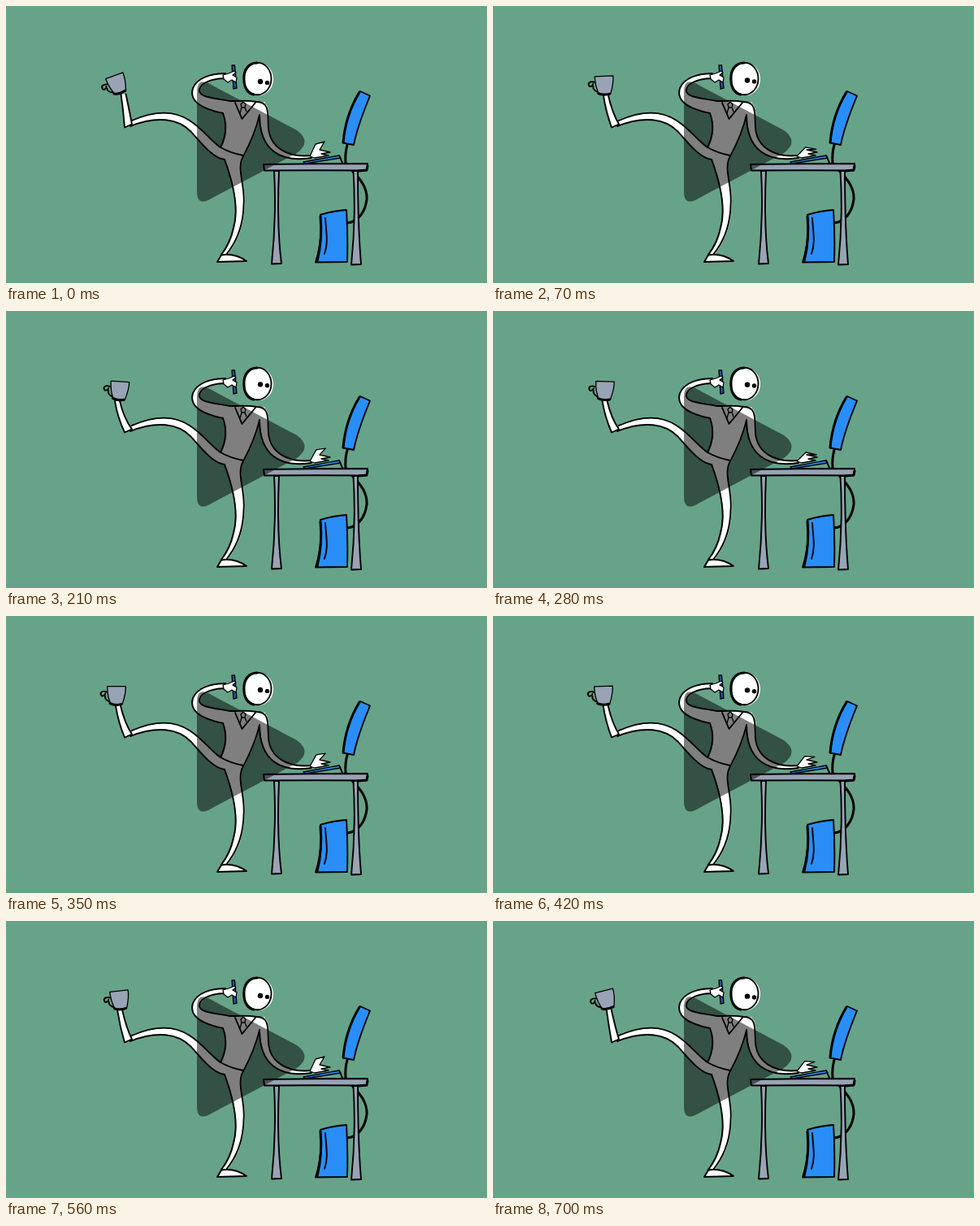
An HTML page that plays this animation: 592x341 px, repeating every 770 ms.

```html
<!DOCTYPE html>
<html lang="en">
<head>
<meta charset="utf-8">
<title>Busy at the desk</title>
<style>
  html, body { margin: 0; width: 100%; height: 100%; overflow: hidden; background: #67a389; }
  svg { display: block; width: 592px; height: 341px; }
  .white { fill: #fff; }
  .blue { fill: #2a8ef8; }
  .steel { fill: #98a3b5; }
  .line { fill: none; }
  .ink { stroke: #000; stroke-width: 1.9; stroke-linecap: round; stroke-linejoin: round; }
  .thin { stroke-width: 1.3; }
  .bold { stroke-width: 3; }
</style>
</head>
<body>
<svg viewBox="0 0 592 341">
  <!-- computer -->
  <g class="ink">
    <path class="line bold" d="M418 193C427 206 445 217 444 238C442 255 432 266 420 267"/>
    <path class="blue" d="M387 257Q403 252 419 251Q421 283 420 315Q401 315 381 315.500C386 300 389 280 387 257Z"/>
    <path class="line bold" d="M387 259C389 280 387 298 383 314"/>
    <path class="line" d="M393 261C394 278 397 292 392 305"/>
    <path class="line bold" d="M420 171Q417 182 418 193"/>
    <path class="blue" d="M436 105L448 110.500C440 130 432 150 428 171L415 168.500C417 145 424 124 436 105Z"/>
    <path class="line bold" d="M435 106C424 124 417 145 415 168"/>
  </g>

  <!-- desk -->
  <g class="ink steel">
    <path d="M330 203H336Q333 270 339 317L327 317.500Q333 260 330 203Z"/>
    <path d="M427.500 203H433Q433 270 437 318L425 318.500Q431 260 427.500 203Z"/>
    <path d="M317 195Q380 194 445 194L444 202.500Q380 202 318 202.500Z"/>
  </g>
  <path class="line ink bold" d="M434 203L444 202L445 197"/>
  <path class="blue ink thin" d="M366 192L410 184L412 187L368 194Z"/>
  <path class="line ink" d="M410 184L414 193"/>

  <!-- figure -->
  <g class="white" transform="translate(1 .6)">
    <path d="M272 117L318 118L312 134C308 152 300 170 292 185L264 175C271 160 272 145 266 133Z"/>
    <path d="M270 83C251 83 235 89 230 101C226 114 234 125 267 133L276 117C256 113 240 113 238 105C237 97 250 89 270 89Z"/>
    <path d="M312 118C325 118 322 134 323 150C325 174 346 187 376 184V187C338 193 312 178 312 134Z"/>
    <path d="M154 141C180 130 205 127 226 141C243 152 252 166 264 174L292 185L269 189C255 187 241 170 228 155C212 138 185 135 153 148Z"/>
    <path d="M264 174L292 185C283 200 295 222 292.500 245C292 270 284 290 271 306L265 306C272 297 277 287 280 273C288 245 276 208 269 189Z"/>
    <path d="M260 315L265 306.500Q282 304 296 314Z"/>
    <ellipse cx="310.5" cy="89.500" rx="17.500" ry="19.800"/>
  </g>
  <g class="line ink">
    <path d="M270 83C251 83 235 89 230 101C226 114 234 125 267 132"/>
    <path d="M270 89C250 89 237 97 238 105C240 113 256 113 276 117H281"/>
    <path d="M281 117Q296 116 309 118C325 118 322 134 323 150C325 174 346 187 376 184"/>
    <path d="M376 187C338 193 312 178 312 134C308 152 300 170 292 185"/>
    <path d="M282 119L290.500 139L307 119"/>
    <path class="thin" d="M289 121L292 118L295 121L294 125H290ZM290 125L288 132M294 125L296 130"/>
    <path d="M267 132C272 145 271 160 264 174Q276 181 292 184"/>
    <path d="M155 141C180 130 205 127 226 141C243 152 252 166 264 174"/>
    <path d="M153 148C185 135 212 138 228 155C241 170 255 187 269 189"/>
    <path d="M269 189C276 208 288 245 280 273C277 287 272 297 265 306"/>
    <path d="M292 185C283 200 295 222 292.500 245C292 270 284 290 271 306"/>
    <path d="M260 315L265 306.500Q282 304 296 314Z"/>
    <ellipse cx="309.500" cy="89.500" rx="17" ry="19.800"/>
    <path class="bold" d="M309 70C298 70 292 79 293 91C293 101 298 108 305 109"/>
  </g>
  <g id="eyes">
    <circle cx="313" r="3.2"/>
    <circle cx="321.5" cy="1.4" r="2.7"/>
  </g>

  <!-- phone hand -->
  <g class="ink thin">
    <path fill="#23549f" d="M278 73L281.500 73L284 101L280 102Z"/>
    <path class="white" d="M267 85L274 83L281 80L283 82L279 85L284 88L283 94L278 91L273 94L268 90Z"/>
  </g>

  <!-- foot and cup -->
  <path id="foot" class="white ink"/>
  <g id="cup" class="ink">
    <path class="line" d="M-12 -4C-17 -6 -21 -4 -19 0C-18 2 -14 0 -14 -2M-14 1C-15 5 -11 7 -9 8"/>
    <path class="steel thin" d="M-11.500 -11H11C11.500 -3 9 5 7 11L-7 11C-10 5 -11.500 -2 -11.500 -11Z"/>
    <path class="line bold" d="M-8 10Q-2 13 6 11"/>
  </g>

  <path id="hand" class="white ink thin"/>

  <!-- play shade -->
  <path d="M235 106Q235 88 250 95.500L358 153Q377 167 358 181L250 238.500Q235 246 235 228Z" opacity=".5"/>
</svg>
<script>
  const STEP = 70, COUNT = 11, SNAP = 2;
  const $ = id => document.getElementById(id);
  const mix = (a, b, t) => a + (b - a) * t;

  function draw(s) {
    // quick snap back, then a slow build up to the next kick
    const u = s < SNAP ? 1 - s / SNAP : (s - SNAP) / (COUNT - SNAP);
    const kick = mix(u, u ** 4, .45);

    const cupX = 138.5 + 2.5 * Math.cos(2 * Math.PI * u / .75);
    const cupY = mix(98, 96, kick);
    $('cup').setAttribute('transform',
      `translate(${cupX} ${cupY}) rotate(${mix(5, -20, kick)})`);

    const x = mix(135.5, 143.5, kick), y = mix(111, 108.5, kick);
    $('foot').setAttribute('d',
      `M${x - 2} ${y}Q${x + 1} 130 146 149.500L155 145.500Q${x + 9} 132 ${x + 4} ${y}`);

    $('eyes').setAttribute('transform', `translate(0 ${mix(90, 93, u)})`);

    // four taps on the keys per loop, three of them fully raised again
    const lift = (.5 + .5 * Math.cos(2 * Math.PI * s * 3 / 8)) ** 1.5;
    const knuckle = `${mix(385, 381, lift)} ${mix(174, 170, lift)}`;
    const tip = `${mix(398, 392, lift)} ${mix(177, 167, lift)}`;
    $('hand').setAttribute('d',
      `M374 185L${knuckle}L${tip}L386 177L399 180L388 182L397 184L380 187Z`);
  }

  function tick() {
    draw(Math.floor(performance.now() / STEP) % COUNT);
    requestAnimationFrame(tick);
  }
  tick();
</script>
</body>
</html>
```
